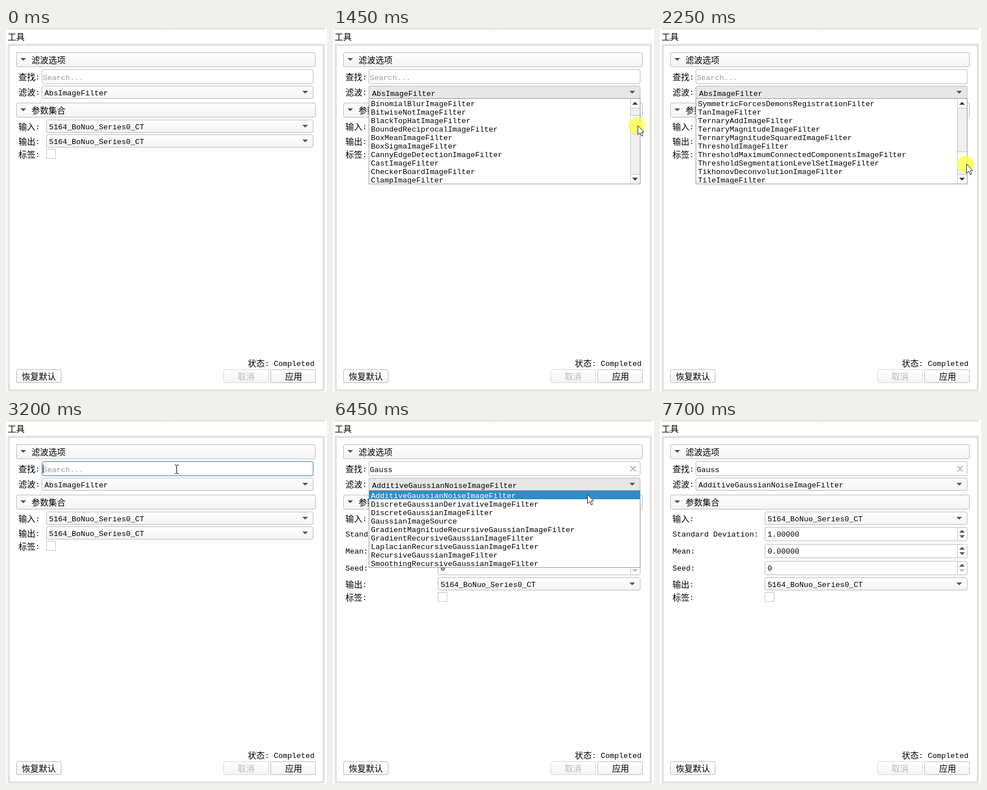
Animation of 567 by 643 pixels, one loop 7750 ms. Source, as an HTML page with a canvas:

```html
<!DOCTYPE html>
<html lang="zh">
<head>
<meta charset="utf-8">
<style>
html, body { margin: 0; width: 567px; height: 643px; overflow: hidden; background: #fff; }
canvas { display: block; }
</style>
</head>
<body>
<canvas id="stage" width="567" height="643"></canvas>
<script>
const ctx = document.getElementById('stage').getContext('2d');
const LOOP = 7750, TICK = 50, ROW = 15;
const MONO = '13.33px "Liberation Mono", monospace';
const HAN = '15px "Noto Sans CJK SC", "Noto Sans CJK", sans-serif';
const SERIES = '5164_BoNuo_Series0_CT';
const BORDER = '#b9b9b9', DARK = '#555', BLUE = '#308cc6';

const filters = `Abs AbsoluteValueDifference Acos AdaptiveHistogramEqualization Add AdditiveGaussianNoise
AggregateLabelMapFilter And AntiAliasBinary ApproximateSignedDistanceMap Asin Atan2 Atan Bilateral
BinaryClosingByReconstruction BinaryContour BinaryDilate BinaryErode BinaryFillhole BinaryGrindPeak
BinaryImageToLabelMapFilter BinaryMagnitude BinaryMedian BinaryMinMaxCurvatureFlow BinaryMorphologicalClosing
BinaryMorphologicalOpening BinaryNot BinaryOpeningByReconstruction BinaryProjection BinaryReconstructionByDilation
BinaryReconstructionByErosion BinaryThinning BinaryThreshold BinaryThresholdProjection BinomialBlur BitwiseNot
BlackTopHat BoundedReciprocal BoxMean BoxSigma CannyEdgeDetection Cast CheckerBoard Clamp ClosingByReconstruction
CollidingFronts ComplexToImaginary ComplexToModulus ComplexToPhase ComplexToReal Compose ConfidenceConnected
ConnectedComponent ConnectedThreshold ConstantPad Convolution Cos Crop CurvatureAnisotropicDiffusion CurvatureFlow
CyclicShift DemonsRegistrationFilter Derivative DilateObjectMorphology DiscreteGaussianDerivative DiscreteGaussian
DisplacementFieldJacobianDeterminantFilter Divide DivideFloor DivideReal DoubleThreshold EdgePotential Equal
ErodeObjectMorphology Exp ExpNegative Expand ExtractImage FFTConvolution FFTPad FFTShift FastApproximateRank
FastMarching FastSymmetricForcesDemonsRegistrationFilter Flip ForwardFFT GaussianImageSource
GeodesicActiveContourLevelSet GradientAnisotropicDiffusion Gradient GradientMagnitude
GradientMagnitudeRecursiveGaussian GradientRecursiveGaussian GrayscaleConnectedClosing GrayscaleConnectedOpening
GrayscaleDilate GrayscaleErode GrayscaleFillhole GrayscaleGeodesicDilate GrayscaleGeodesicErode GrayscaleGrindPeak
GrayscaleMorphologicalClosing GrayscaleMorphologicalOpening Greater GreaterEqual GridImageSource HConcave HConvex
HMaxima HMinima HalfHermitianToRealInverseFFT HistogramMatching IntensityWindowing IntermodesThreshold
InverseDeconvolution InverseDisplacementField InverseFFT InvertIntensity IsoContourDistance IsoDataThreshold
IsolatedConnected IsolatedWatershed JoinSeries LabelContour LabelImageToLabelMapFilter LabelMapContourOverlay
LabelMapMask LabelMapOverlay LabelMapToBinary LabelMapToLabel LabelMapToRGB LabelOverlay LabelToRGB LabelUniqueLabelMapFilter
LabelVoting Laplacian LaplacianRecursiveGaussian LaplacianSegmentationLevelSet LaplacianSharpening Less LessEqual
LevelSetMotionRegistrationFilter Log10 Log MagnitudeAndPhaseToComplex Mask MaskNegated MaximumEntropyThreshold Maximum
MaximumProjection Mean MeanProjection Median MedianProjection MergeLabelMapFilter MinMaxCurvatureFlow Minimum
MinimumProjection MirrorPad Modulus MomentsThreshold MorphologicalGradient MorphologicalWatershedFromMarkers
MorphologicalWatershed MultiLabelSTAPLE Multiply N4BiasFieldCorrection NaryAdd NaryMaximum NeighborhoodConnected
Noise NormalizeImage NormalizeToConstant NormalizedCorrelation Not NotEqual ObjectnessMeasure OpeningByReconstruction
Or PasteImage PatchBasedDenoising PermuteAxes PhysicalPointImageSource Pow ProjectedDeconvolution RankImage
RealAndImaginaryToComplex RealToHalfHermitianForwardFFT ReconstructionByDilation ReconstructionByErosion
RecursiveGaussian RegionOfInterest RegionalMaxima RegionalMinima RelabelComponent RelabelLabelMapFilter
RenyiEntropyThreshold Resample RescaleIntensity Round SaltAndPepperNoise ScalarChanAndDenseLevelSet
ScalarConnectedComponent ScalarImageKmeans ScalarToRGBColormap ShanbhagThreshold ShapeDetectionLevelSet ShiftScale
ShotNoise Shrink Sigmoid SignedDistanceMap SimilarityIndex SimpleContourExtractor Sin Slice SmoothingRecursiveGaussian
SpeckleNoise Sqrt Square SquaredDifference StandardDeviationProjection StatisticsImage Subtract
SymmetricForcesDemonsRegistrationFilter Tan TernaryAdd TernaryMagnitude TernaryMagnitudeSquared Threshold
ThresholdMaximumConnectedComponents ThresholdSegmentationLevelSet TikhonovDeconvolution Tile
TransformToDisplacementFieldFilter TriangleThreshold UnaryMinus UnsharpMask ValuedRegionalMaxima ValuedRegionalMinima
VectorConfidenceConnected VectorConnectedComponent VectorIndexSelectionCast VectorMagnitude VotingBinaryHoleFilling
VotingBinary VotingBinaryIterativeHoleFilling Warp WhiteTopHat WrapPad Xor ZeroCrossingBasedEdgeDetection ZeroCrossing
ZeroFluxNeumannPad`.split(/\s+/).map(n => /(Filter|Source)$/.test(n) ? n : n + 'ImageFilter');
const gaussFilters = filters.filter(n => n.includes('Gauss'));
const lastTop = filters.length - 10;

const pointerPath = [
  [250, 566, 160], [550, 528, 114], [700, 528, 114], [1000, 537, 162], [1100, 537, 162],
  [1450, 538, 172], [2250, 541, 240], [2500, 541, 246], [2650, 541, 246], [2950, 301, 86],
  [5250, 301, 86], [5500, 506, 126], [5700, 533, 114], [5750, 533, 114], [5900, 449, 127],
  [6400, 449, 127], [6450, 449, 131]];
const scrollPath = [[1100, 0], [1450, 34],
  [2250, filters.findIndex(n => n.startsWith('SymmetricForces'))], [2500, lastTop]];
const keyTimes = [4200, 4450, 4500, 4600, 4750];
const downTimes = [6800, 6950, 7050, 7150, 7250, 7300, 7400, 7500];

const within = (t, a, b) => t >= a && t < b;
const countPast = (times, t) => times.filter(k => k <= t).length;

function along(path, t, i) {
  const n = path.findIndex(k => k[0] > t);
  if (n === 0) return path[0][i];
  if (n < 0) return path[path.length - 1][i];
  const a = path[n - 1], b = path[n];
  return a[i] + (b[i] - a[i]) * (t - a[0]) / (b[0] - a[0]);
}

// Latin cells are 8px wide, Han cells 15px; cy is the vertical middle.
function text(str, x, cy, color = '#000') {
  ctx.fillStyle = color;
  for (const run of str.match(/[\x00-\x7f]+|[^\x00-\x7f]+/g) || []) {
    const latin = run.charCodeAt(0) < 128;
    ctx.font = latin ? MONO : HAN;
    ctx.fillText(run, x, cy + (latin ? 5 : 5.5));
    x += run.length * (latin ? 8 : 15);
  }
}

function rect(x, y, w, h, fill, stroke = BORDER, radius = 0) {
  ctx.beginPath();
  ctx.roundRect(x + .5, y + .5, w - 1, h - 1, radius);
  ctx.fillStyle = fill;
  ctx.fill();
  ctx.strokeStyle = stroke;
  ctx.lineWidth = 1;
  ctx.stroke();
}

function raised(x, y, w, h, stroke) {
  const g = ctx.createLinearGradient(0, y, 0, y + h);
  g.addColorStop(0, '#fff');
  g.addColorStop(1, '#f3f3f3');
  rect(x, y, w, h, g, stroke, 2.5);
}

function poly(points, color) {
  ctx.beginPath();
  points.forEach(([x, y]) => ctx.lineTo(x, y));
  ctx.closePath();
  ctx.fillStyle = color;
  ctx.fill();
}

function triangle(cx, cy, dir = 1, color = DARK) {
  poly([[cx - 5, cy - 2.5 * dir], [cx + 5, cy - 2.5 * dir], [cx, cy + 2.5 * dir]], color);
}

function header(y, label) {
  raised(18, y, 529, 26);
  triangle(30.5, y + 12.5);
  text(label, 45, y + 13);
}

function combo(x, y, h, label, indent, open) {
  if (open) rect(x, y, 543 - x, h, '#e7e7e7', BORDER, 2.5);
  else raised(x, y, 543 - x, h);
  text(label, x + indent + (open ? 1 : 0), y + (h >> 1) + (open ? 2 : 1));
  triangle(528.5, y + h / 2);
}

function spin(y, label, value, canLower) {
  text(label, 22, y + 12);
  rect(185, y, 358, 25, '#fff', BORDER, 2.5);
  ctx.fillStyle = BORDER;
  ctx.fillRect(525, y + 1, 1, 23);
  triangle(533.5, y + 7.5, -1);
  triangle(533.5, y + 17, 1, canLower ? DARK : '#bbb');
  text(value, 190, y + 12);
}

function button(x, label, textX, enabled = true) {
  raised(x, 603, 80, 24, enabled ? BORDER : '#d6d6d6');
  text(label, textX, 615, enabled ? '#000' : '#b8b8b8');
}

function frame() {
  ctx.fillStyle = '#fff';
  ctx.fillRect(0, 0, 567, 643);
  ctx.fillStyle = '#bdbdbd';
  ctx.fillRect(2, 1, 561, 1);
  for (let x = 276; x < 292; x += 3) ctx.fillRect(x, 4, 1, 1);
  text('工具', 3, 15);
  rect(3, 28, 560, 614, '#fff', '#d6d6d6');
  rect(5, 30, 556, 610, '#fff', '#c0c0c0');
  header(43, '滤波选项');
  text('查找:', 22, 86);
  text('滤波:', 22, 113);
  header(132, '参数集合');
  text('状态: Completed', 427, 592);
  button(18, '恢复默认', 28);
  button(384, '取消', 409, false);
  button(467, '应用', 493);
}

function searchBox(t) {
  const focus = within(t, 3200, 5750);
  const typed = 'Gauss'.slice(0, countPast(keyTimes, t));
  rect(63, 73, 480, 26, '#fff', focus ? '#2a78ab' : BORDER, 2.5);
  text(typed || 'Search...', 65, 87, typed ? '#000' : '#9a9a9a');
  if (typed) {
    ctx.strokeStyle = t < 4250 ? '#d4d4d4' : '#a8a8a8';
    ctx.lineWidth = 1.7;
    ctx.beginPath();
    for (const s of [-1, 1]) {
      ctx.moveTo(525, 86 - 5 * s);
      ctx.lineTo(535, 86 + 5 * s);
    }
    ctx.stroke();
  }
  if (focus && !within(t, 3550, 3850) && !within(t, 5150, 5450)) {
    ctx.fillStyle = '#000';
    ctx.fillRect(65 + 8 * typed.length, 79, 1, 15);
  }
}

function parameters(gauss) {
  const x = gauss ? 185 : 71, outY = gauss ? 278 : 188;
  text('输入:', 22, 174);
  combo(x, 162, 23, SERIES, 5);
  if (gauss) {
    spin(189, 'Standard Deviation:', '1.00000', true);
    spin(219, 'Mean:', '0.00000', true);
    spin(249, 'Seed:', '0', false);
  }
  text('输出:', 22, outY + 12);
  combo(x, outY, 23, SERIES, 5);
  text('标签:', 22, outY + 35);
  rect(x, outY + 26, 17, 17, '#fff', '#c4c4c4');
}

function popup(items, top, selected, scrolls) {
  const rows = items.slice(top, top + 10);
  rect(63, 124, 480, rows.length * ROW + 2, '#fff', '#949494');
  rows.forEach((name, i) => {
    const y = 125 + i * ROW, active = top + i === selected;
    if (active) {
      ctx.fillStyle = BLUE;
      ctx.fillRect(64, y, scrolls ? 462 : 478, ROW);
    }
    text(name, 67, y + 8, active ? '#fff' : '#000');
  });
  if (!scrolls) return;
  rect(525, 124, 18, 152, '#eff0f1', '#c4c4c4');
  rect(525, 124, 18, 18, '#fcfcfc', '#c4c4c4');
  rect(525, 258, 18, 18, '#fcfcfc', '#c4c4c4');
  rect(525, Math.round(142 + 83 * top / lastTop), 18, 33, '#fcfcfc', '#c4c4c4');
  triangle(533.5, 133, -1, '#333');
  triangle(533.5, 267, 1, '#333');
  ctx.strokeStyle = '#949494';
  ctx.strokeRect(63.5, 124.5, 479, 151);
}

function pointer(t, x, y) {
  if (within(t, 600, 700) || within(t, 1100, 2550) || within(t, 5700, 5800)) {
    ctx.beginPath();
    ctx.arc(x - 1, y + .5, 15, 0, 2 * Math.PI);
    ctx.fillStyle = 'rgba(255,255,60,.75)';
    ctx.fill();
  }
  if (t >= 3200 && y < 99) {
    ctx.fillStyle = '#000';
    ctx.fillRect(x, y - 6, 1, 14);
    for (const barY of [y - 7, y + 8]) {
      ctx.fillRect(x - 3, barY, 3, 1);
      ctx.fillRect(x + 1, barY, 3, 1);
    }
    return;
  }
  const shape = [[0, 0], [0, 16], [4, 12.5], [6.5, 18.5], [9, 17.5], [6.5, 11.5], [11, 11.5]];
  poly(shape.map(([dx, dy]) => [x + dx + .5, y + dy + .5]), '#fff');
  ctx.strokeStyle = '#222';
  ctx.lineWidth = 1;
  ctx.stroke();
}

function draw(t) {
  const x = Math.round(along(pointerPath, t, 1)), y = Math.round(along(pointerPath, t, 2));
  const allOpen = within(t, 650, 3200), gaussOpen = within(t, 5750, 7700);
  const gauss = t >= 4450;
  frame();
  searchBox(t);
  combo(63, 102, 23, (gauss ? gaussFilters : filters)[0], 5, allOpen || gaussOpen);
  parameters(gauss);
  if (allOpen) {
    const top = Math.round(along(scrollPath, t, 1));
    const hovered = Math.max(0, Math.min(9, Math.floor((y - 125) / ROW)));
    popup(filters, top, t >= 2700 ? top + hovered : 0, true);
  }
  if (gaussOpen) popup(gaussFilters, 0, countPast(downTimes, t), false);
  if (within(t, 250, 4200) || within(t, 5300, 6800)) pointer(t, x, y);
}

function tick() {
  draw(Math.floor(performance.now() % LOOP / TICK) * TICK);
  requestAnimationFrame(tick);
}
tick();
</script>
</body>
</html>
```
